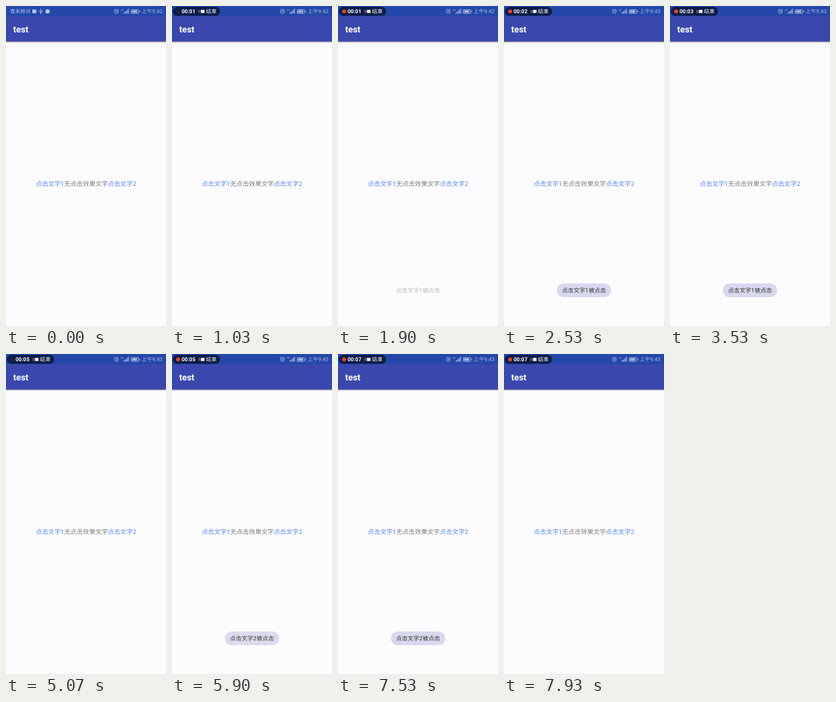
An HTML page for the animation above (8000 ms loop, 200 by 400 pixels).

```html
<!DOCTYPE html>
<html lang="zh-CN">
<head>
<meta charset="utf-8">
<style>
  html, body { margin: 0; width: 100%; height: 100%; overflow: hidden; background: #fcfcfe; }
  svg { display: block; width: 200px; height: 400px; font-family: Roboto, "Noto Sans CJK SC", "Noto Sans CJK", sans-serif; text-rendering: geometricPrecision; }
  .link { fill: #5686f4; }
</style>
</head>
<body>
<svg viewBox="0 0 200 400">
  <rect width="200" height="400" fill="#fcfcfe"/>
  <rect width="200" height="44" fill="#3a48ae"/>
  <rect width="200" height="13" fill="#2448aa"/>
  <rect y="44" width="200" height="1" fill="#807ca4"/>
  <rect y="45" width="200" height="1" fill="#dcd4dc"/>
  <text x="9" y="33" font-size="11" font-weight="700" fill="#fff">test</text>

  <!-- status bar, left -->
  <g fill="#b6c4ea">
    <text x="5" y="9.2" font-size="6.5">青禾移讯</text>
    <rect x="33" y="4.3" width="4.8" height="4.8"/>
    <path d="M43.5 10V3.5M41.8 5.5V7L43.5 8.3L45.3 7V5.5" fill="none" stroke="#b6c4ea" stroke-width=".8"/>
    <circle cx="52" cy="6.8" r="2.7"/>
  </g>

  <!-- status bar, right -->
  <g fill="none" stroke="#a8b8e0" stroke-width=".8">
    <circle cx="138" cy="7" r="2.3"/>
    <path d="M138 5.6V7.1H139.2M135.4 4.8L136.6 3.8M140.6 4.8L139.4 3.8"/>
    <rect x="156.5" y="4.6" width="9.4" height="4.6" rx=".7"/>
    <path d="M167 5.8V8"/>
  </g>
  <g fill="#a8b8e0">
    <text x="143.3" y="6" font-size="3">4G</text>
    <path d="M147 9.6V8H148.2V9.6ZM148.8 9.6V6.8H150V9.6ZM150.6 9.6V5.3H151.8V9.6ZM152.4 9.6V3.6H153.6V9.6Z"/>
    <rect x="157.5" y="5.4" width="6.4" height="3"/>
    <text id="clock" x="169.5" y="9.2" font-size="6.7"></text>
  </g>

  <!-- recorder pill -->
  <g id="recorder" font-size="6.7" font-weight="700" fill="#fff">
    <rect x="1" y="1" width="59" height="11.3" rx="5.6" fill="#0a1c48"/>
    <circle id="dot" cx="7.6" cy="6.7" r="2.5" fill="#f0401c"/>
    <text id="timer" x="12" y="9.2"></text>
    <rect x="32.7" y="5" width="3" height="3.6" fill="#70485c"/>
    <rect x="36.2" y="4.8" width="4.4" height="4" fill="#f2f2f2"/>
    <text x="42.6" y="9.2" font-size="6.6" font-weight="500">结束</text>
  </g>

  <text x="100" y="225" font-size="7.8" text-anchor="middle" fill="#7c7c7c"><tspan class="link">点击文字1</tspan>无点击效果文字<tspan class="link">点击文字2</tspan></text>
  <circle id="touch" cy="224" r="7.5" fill="#888" fill-opacity=".12" stroke="#888" stroke-opacity=".35" stroke-width=".7"/>

  <rect id="toastBox" x="66" y="346.8" width="68" height="17.2" rx="8.6" fill="#d8d8ee"/>
  <text id="toastText" x="100" y="358.2" font-size="7.3" text-anchor="middle" fill="#383838"/>
</svg>
<script>
const LOOP = 8000;
const el = id => document.getElementById(id);
const ramp = (t, from, to) => Math.min(1, Math.max(0, (t - from) / (to - from)));
const pulse = (t, [inFrom, inTo, outFrom, outTo]) => ramp(t, inFrom, inTo) * (1 - ramp(t, outFrom, outTo));

const touches = [
  { x: 56, times: [1530, 1600, 1720, 1930] },
  { x: 100, times: [4330, 4400, 4570, 4770] },
  { x: 146, times: [5500, 5540, 5640, 5860] }
];
const toasts = [
  { text: '点击文字1被点击', times: [1790, 2130, 3830, 4170] },
  { text: '点击文字2被点击', times: [5600, 5910, 7550, 7910] }
];

function draw(t) {
  const recording = Math.max(0, t - 30);
  el('recorder').setAttribute('opacity', ramp(t, 30, 170));
  el('timer').textContent = '00:0' + Math.floor(recording / 1000);
  el('dot').setAttribute('opacity', recording % 1000 >= 500 ? 1 : 0.1);
  el('clock').textContent = t < 2370 ? '上午9:42' : '上午9:43';

  const touch = touches.find(p => t < p.times[3]) || touches[2];
  el('touch').setAttribute('cx', touch.x);
  el('touch').setAttribute('opacity', pulse(t, touch.times));

  const toast = toasts[t < 5000 ? 0 : 1];
  const alpha = pulse(t, toast.times);
  el('toastText').textContent = toast.text;
  el('toastText').setAttribute('opacity', alpha);
  el('toastBox').setAttribute('opacity', alpha ** 3.5);
}

const start = performance.now();
function tick() {
  draw((performance.now() - start) % LOOP);
  requestAnimationFrame(tick);
}
tick();
</script>
</body>
</html>
```
